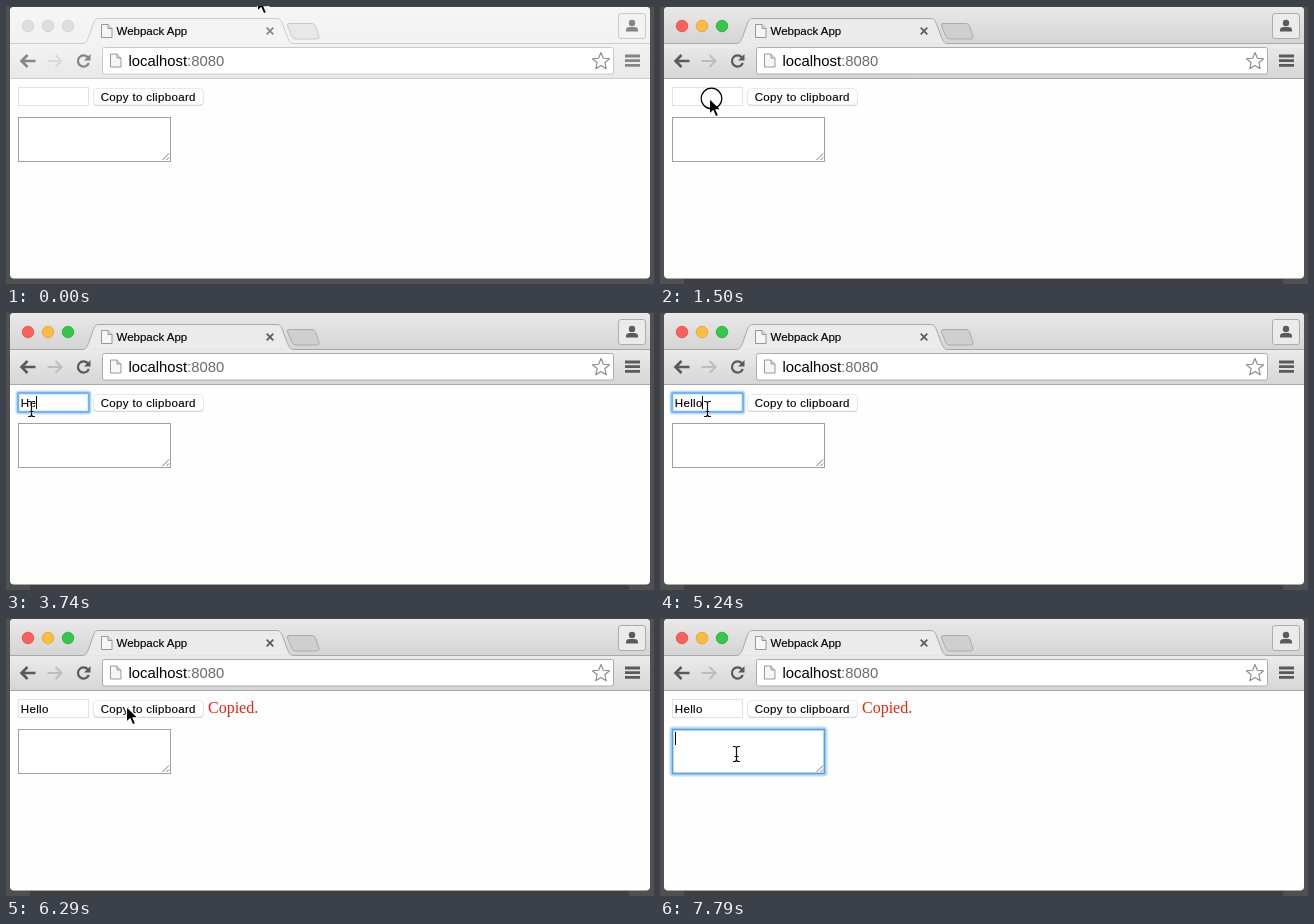
Write an HTML page that moves like this. It is 648 px wide and 278 px high and loops after 8000 ms.

```html
<!DOCTYPE html>
<html lang="en">
<head>
<meta charset="utf-8">
<title>Copy to clipboard</title>
<style>
  html, body { margin: 0; width: 100%; height: 100%; overflow: hidden; background: #505050; }
  svg { display: block; width: 100%; height: 100%;
        --bar1: #f5f5f5; --bar2: #f2f2f2; --tool1: #f3f3f3; --tool2: #e8e8e8; --line: #cdcdcd;
        --icon: #858585; --faint: #dadada; --plus: #e8e8e8; --edge: #cacaca; }
  svg.active { --bar1: #e9e9e9; --bar2: #d4d4d4; --tool1: #ebebeb; --tool2: #d6d6d6; --line: #a8a8a8;
        --icon: #5a5a5a; --faint: #bdbdbd; --plus: #cfcfcf; --edge: #acacac; }
  text { font: 11.5px "Liberation Sans", Arial, sans-serif; letter-spacing: .33px; fill: #000; }
  .bar1 { stop-color: var(--bar1); } .bar2 { stop-color: var(--bar2); }
  .tool1 { stop-color: var(--tool1); } .tool2 { stop-color: var(--tool2); }
  .fill { fill: var(--icon); }
  .line { fill: none; stroke: var(--icon); }
  .tab { fill: var(--tool1); stroke: var(--line); }
  .label { stroke: #000; stroke-width: .15; }
  .lights circle { fill: #dedede; stroke: #cecece; stroke-width: .8; }
  .active .lights circle { fill: var(--c); stroke: var(--s); }
  #shade { fill: #404040; visibility: hidden; }
  .active #shade { visibility: visible; }
  .focus rect { fill: none; }
</style>
</head>
<body>
<svg id="stage" viewBox="0 0 648 278" preserveAspectRatio="none">
  <defs>
    <linearGradient id="bar" x2="0" y2="1"><stop class="bar1"/><stop class="bar2" offset="1"/></linearGradient>
    <linearGradient id="tool" x2="0" y2="1"><stop class="tool1"/><stop class="tool2" offset="1"/></linearGradient>
    <clipPath id="frame"><rect x="4" y="1" width="640" height="271.5" rx="4"/></clipPath>
    <g id="page" fill="#f6f6f6" stroke="#8f8f8f" stroke-width=".9">
      <path d="M.5.5H7L11 4.5V13.5H.5Z"/><path d="M7 .5V4.5H11" fill="#ddd"/>
    </g>
    <path id="arrow" d="M0 0V15.6L3.6 12.2L6.2 18.2L9 17L6.5 11.2H11.4Z" stroke="#fff" stroke-width="1.1"/>
    <path id="beamShape" fill="none" d="M-3.5-7.5H-2Q0-7.5 0-5.5V5.5Q0 7.5-2 7.5H-3.5M3.5-7.5H2Q0-7.5 0-5.5M0 5.5Q0 7.5 2 7.5H3.5M-2 2.5H2"/>
    <g id="beam">
      <use href="#beamShape" stroke="#fff" stroke-width="2.4" opacity=".7"/>
      <use href="#beamShape" stroke="#111" stroke-width="1.2"/>
    </g>
  </defs>

  <rect width="648" height="1" fill="#444"/>
  <rect id="shade" x="24" y="273" width="599" height="5"/>
  <g clip-path="url(#frame)">
    <path d="M4 1H644V273H4Z" fill="#fefefe"/>
    <path d="M4 1H644V38H4Z" fill="url(#bar)"/>
    <path d="M4 38H644V72H4Z" fill="url(#tool)"/>
    <path d="M4 37.5H77M287 37.5H644M4 72.5H644" stroke="var(--line)"/>
  </g>

  <g class="lights">
    <circle cx="22" cy="20" r="5.8" style="--c:#fc605b;--s:#e4504b"/>
    <circle cx="42" cy="20" r="5.8" style="--c:#fdbc40;--s:#dfa233"/>
    <circle cx="62" cy="20" r="5.8" style="--c:#34c84a;--s:#2bac3c"/>
  </g>

  <path class="tab" d="M76 37.5C80 37.5 81 35 83 30L87 18.5C88.5 14 89.5 12.5 93 12.5H270C274 12.5 275 14 276.5 18L281 30C283 35 284 37.5 288 37.5"/>
  <path d="M79 38H285" stroke="var(--tool1)"/>
  <path d="M283 17.5H306Q308.5 17.5 309.5 20L313 30.5Q313.5 33 311 33H290Q287 33 286 30.5L281.5 20Q281 17.5 283 17.5Z" fill="var(--plus)" stroke="var(--edge)"/>
  <use href="#page" x="95" y="18"/>
  <text class="label" x="110.5" y="29" style="letter-spacing:0">Webpack App</text>
  <path class="line" d="M260.7 21.7L267.3 28.3M267.3 21.7L260.7 28.3" stroke-width="1.7"/>
  <rect x="612.5" y="7.5" width="27" height="25" rx="2.5" fill="var(--tool1)" stroke="var(--edge)"/>
  <g class="fill"><circle cx="626" cy="17" r="3.2"/><path d="M620 25.5V24Q620 21 624 21H628Q632 21 632 24V25.5Z"/></g>

  <path class="line" d="M29.5 55H16M21.5 49L15.5 55L21.5 61" stroke-width="2.6"/>
  <path d="M41.5 55H55M49.5 49L55.5 55L49.5 61" fill="none" stroke="var(--faint)" stroke-width="2"/>
  <path class="line" d="M81.8 51.3A5.6 5.6 0 1 0 82.8 57" stroke-width="2.2"/>
  <path class="fill" d="M84.5 48V54.5H78Z"/>

  <rect x="96.5" y="41.5" width="511" height="26.5" rx="2" fill="#fff" stroke="var(--edge)"/>
  <use href="#page" x="104" y="47.5"/>
  <text x="122.5" y="60" style="font-size:14.85px;letter-spacing:0">localhost<tspan fill="#6b6b6b">:8080</tspan></text>
  <path id="star" fill="#fff" stroke="#8a8a8a" stroke-width="1.1" stroke-linejoin="round"/>
  <path class="line" d="M619 50H634M619 54.7H634M619 59.4H634" stroke-width="2.8"/>

  <rect x="12.5" y="81.5" width="70" height="18" fill="#fff" stroke="#e2e2e2"/>
  <g id="inputFocus" class="focus">
    <rect x="11.5" y="80.5" width="72" height="20" rx="2" stroke="#a5d0f8" stroke-width="4" opacity=".75"/>
    <rect x="12" y="81" width="71" height="19" rx="1" stroke="#74b4f2" stroke-width="2"/>
  </g>
  <text id="typed" class="label" x="14.8" y="95"></text>

  <rect x="87.5" y="83" width="110" height="17" rx="4" fill="#cecece"/>
  <rect x="87.5" y="82.5" width="110" height="16.5" rx="4" fill="#fff" stroke="#e4e4e4" stroke-width=".8"/>
  <text class="label" x="94.7" y="95">Copy to clipboard</text>
  <text id="copied" x="202" y="95" style="font:16px 'Liberation Serif',Times,serif;letter-spacing:0;fill:#f8200c">Copied.</text>

  <rect x="12.5" y="111.5" width="152" height="44" fill="#fff" stroke="#a0a0a0"/>
  <path d="M156.5 154L163 147.5M160.5 154L163 151.5" stroke="#777"/>
  <g id="areaFocus" class="focus">
    <rect x="11.5" y="110.5" width="154" height="46" rx="2" stroke="#a5d0f8" stroke-width="4" opacity=".75"/>
    <rect x="12.5" y="111.5" width="152" height="44" stroke="#5a9fde" stroke-width="1.6"/>
  </g>
  <rect id="caret" width="1" height="13"/>

  <use id="cursor"/>
  <circle id="ring" r="10.3" fill="none" stroke="#000" stroke-width="1.2"/>
</svg>
<script>
const LOOP = 8000;
const $ = id => document.getElementById(id);

// Pointer stops: start time, shape, x, y
const stops = [
  [0, 'arrow', 251.5, -10.5], [150, 'arrow', 224, -3], [300, 'arrow', 190, 8],
  [450, 'arrow', 156, 18], [600, 'arrow', 124, 27], [750, 'arrow', 97.5, 34],
  [900, 'arrow', 74, 59], [1050, 'arrow', 56, 83], [1200, 'arrow', 49.5, 92.5],
  [1940, 'beam', 26, 94.5], [2540, 'beam', 25.5, 97],
  [5240, 'beam', 47.5, 97], [5390, 'beam', 72, 97], [5540, 'arrow', 102, 91.5],
  [5690, 'arrow', 116, 90], [5840, 'arrow', 120.5, 88.5], [7190, 'arrow', 112, 97],
  [7340, 'beam', 92, 120], [7490, 'beam', 79, 133], [7640, 'beam', 76.5, 136]
];
const keyTimes = [3440, 3740, 3890, 4040, 4190];
const clicks = [[1350, 1640], [2240, 2540], [6140, 6290], [7640, 7790]];
const caretOn = [[2390, 2990], [3440, 4790], [5240, 5840], [7640, LOOP]];

const within = (t, spans) => spans.some(([a, b]) => t >= a && t < b);
const show = (id, on) => $(id).setAttribute('visibility', on ? 'visible' : 'hidden');
const place = (id, attrs) => {
  for (const name in attrs) $(id).setAttribute(name, attrs[name]);
};

const starPoints = Array.from({ length: 10 }, (_, i) => {
  const r = i % 2 ? 4 : 9, a = i * Math.PI / 5;
  return `${595 + r * Math.sin(a)} ${55.5 - r * Math.cos(a)}`;
});
$('star').setAttribute('d', `M${starPoints.join('L')}Z`);

function draw(t) {
  const [, shape, x, y] = stops.filter(s => s[0] <= t).pop();
  const inArea = t >= 7640;

  $('stage').classList.toggle('active', t >= 1200);
  $('typed').textContent = 'Hello'.slice(0, keyTimes.filter(k => k <= t).length);
  show('inputFocus', within(t, [[2390, 6140]]));
  show('areaFocus', inArea);
  show('copied', t >= 6290);

  const caretX = inArea ? 15 : 15 + $('typed').getComputedTextLength();
  place('caret', { x: Math.round(caretX - .4), y: inArea ? 114 : 84 });
  show('caret', within(t, caretOn));

  place('cursor', { href: '#' + shape, x, y });
  place('ring', { cx: shape === 'arrow' ? x + 2 : x, cy: y });
  show('ring', within(t, clicks));
}

function tick(now) {
  draw(now % LOOP);
  requestAnimationFrame(tick);
}
draw(0);
requestAnimationFrame(tick);
</script>
</body>
</html>
```
